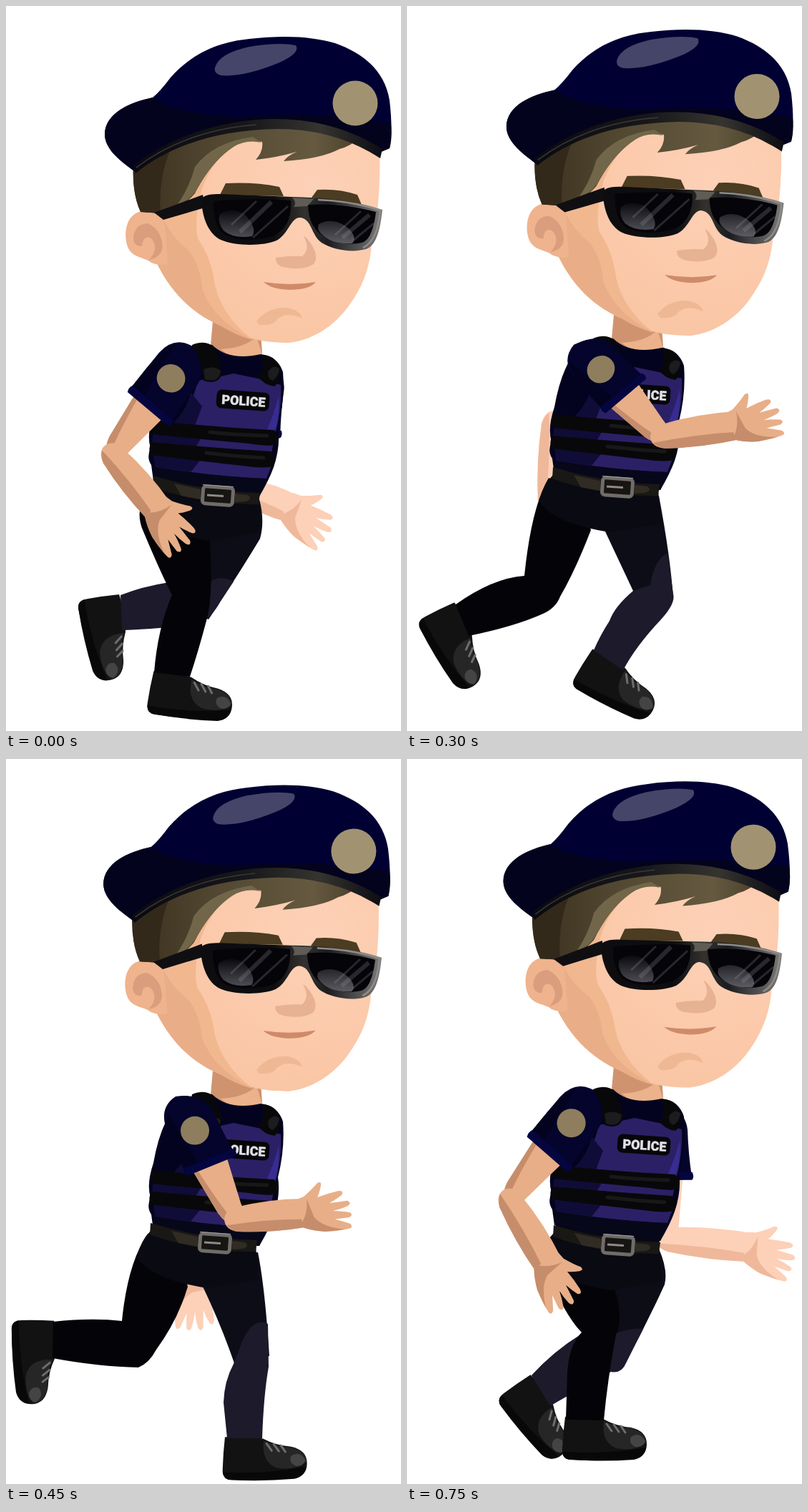
Write an HTML page that moves like this. It is 552x1014 px and loops after 900 ms.

```html
<!DOCTYPE html>
<html lang="en">
<head>
<meta charset="utf-8">
<title>Running officer</title>
<style>
html, body { margin: 0; width: 100%; height: 100%; overflow: hidden; background: #fff; }
svg { display: block; width: 552px; height: 1014px; }
.near { --skin: #e8ae87; --shade: #c58d6b; }
.far { --skin: #fdd0b8; --shade: #efb89b; }
.label { font: 900 18px Roboto, "Liberation Sans", sans-serif; fill: #e0e0e6; stroke: #e0e0e6; stroke-width: .5; text-anchor: middle; }
</style>
</head>
<body>
<svg viewBox="0 0 552 1014">
  <defs>
    <radialGradient id="face" gradientUnits="userSpaceOnUse" cx="430" cy="250" r="240"><stop stop-color="#fdd1b7"/><stop offset=".5" stop-color="#fccbad"/><stop offset="1" stop-color="#f9c5a3"/></radialGradient>
    <linearGradient id="hair" x1="0" x2="1"><stop stop-color="#3b301e"/><stop offset=".35" stop-color="#514630"/><stop offset=".8" stop-color="#655a40"/><stop offset="1" stop-color="#4a3f2a"/></linearGradient>
    <linearGradient id="band" x1="0" x2="1"><stop stop-color="#0a0a10"/><stop offset=".45" stop-color="#17171a"/><stop offset=".75" stop-color="#35342f"/><stop offset="1" stop-color="#0d0d14"/></linearGradient>
    <linearGradient id="frame" x1="0" x2="1"><stop offset=".4" stop-color="#0d0d10"/><stop offset=".57" stop-color="#33322f"/><stop offset=".7" stop-color="#1c1c20"/><stop offset="1" stop-color="#7d7b79"/></linearGradient>
    <linearGradient id="glare" x1="0" y1="0" x2="0" y2="1"><stop stop-color="#0a0a0f"/><stop offset="1" stop-color="#5c5c62"/></linearGradient>

    <g id="upper">
      <path fill="var(--skin)" d="M60 -28L60 29L152 20Q176 16 175 0Q172 -14 152 -15Z"/>
      <path fill="var(--shade)" d="M70 28L152 20Q170 16 174 4Q140 14 70 22Z"/>
    </g>
    <g id="fore">
      <path fill="var(--skin)" d="M0 -16Q50 -24 102 -20L102 20Q50 24 0 18Q-18 14 -18 0Q-16 -14 0 -16Z"/>
      <path fill="var(--shade)" d="M-15 8Q45 4 102 9L102 20Q50 24 0 18Q-10 15 -15 8Z"/>
    </g>
    <g id="hand" transform="scale(1.07)">
      <path fill="var(--skin)" d="M-6 -19L5 -21Q18 -28 26 -34Q32 -36 30 -30Q26 -21 22 -16Q36 -18 50 -18Q58 -17 54 -12Q46 -8 36 -5Q48 -4 59 -3Q65 1 58 4Q48 6 38 6Q50 9 59 13Q63 17 57 19Q46 18 38 17L56 27Q60 33 53 33Q36 33 22 30Q8 26 -4 19Z"/>
      <path fill="var(--shade)" d="M8 -17Q6 0 -5 12L-4 19Q8 26 22 30L48 33Q20 24 12 8Z"/>
    </g>
    <g id="sleeve">
      <path fill="#04042c" d="M-22 4Q-18 32 14 35Q50 36 84 37L86 -37Q50 -34 20 -35Q-10 -34 -22 4Z"/>
      <path fill="#030320" d="M-10 24Q10 35 40 36L82 37L83 14Q40 20 -10 24Z"/>
      <path fill="#050540" d="M74 37Q80 40 86 37L90 -37Q86 -41 79 -38Z"/>
    </g>
    <g id="shoe">
      <path fill="#121212" d="M-26 -3Q0 -6 27 0Q45 10 66 12Q88 17 88 35Q88 53 70 56Q25 59 -18 57Q-31 56 -30 42Q-29 20 -26 -3Z"/>
      <path fill="#262626" d="M28 3Q46 12 66 13Q86 18 87 34Q70 46 45 41Q24 32 28 3Z"/>
      <path fill="#444" d="M66 25Q78 17 86 31Q82 41 72 39Q62 34 66 25Z"/>
      <path fill="#080808" d="M-30 46Q30 50 87 40Q85 54 70 57Q25 60 -18 57Q-29 57 -30 46Z"/>
      <path stroke="#6d6d6d" stroke-width="3" stroke-linecap="round" d="M32 7L39 17M42 8L49 18M52 10L58 19"/>
    </g>
  </defs>

  <g class="far">
    <use id="fUpper" href="#upper"/><use id="fFore" href="#fore"/><use id="fHand" href="#hand"/><use id="fSleeve" href="#sleeve"/>
  </g>
  <use id="fShoe" href="#shoe"/>
  <path id="fThigh" fill="#0d0d17"/>
  <path id="fShin" fill="#1c1a2b"/>
  <use id="nShoe" href="#shoe"/>
  <path id="nLeg" fill="#040408"/>

  <g id="hips">
    <path fill="#0a0a12" d="M214 640L206 668Q192 682 187 705Q205 735 285 748L357 736L353 690L356 650Z"/>
  </g>

  <g id="torso">
    <path fill="#d0936f" d="M290 430L286 474Q305 500 340 496L358 486L355 440Z"/>
    <path fill="#ecb28c" d="M300 480Q335 478 350 462L358 488Q325 502 300 480Z"/>
    <path fill="#03031f" d="M246 486Q262 470 288 474Q312 497 356 487Q380 490 387 512Q390 550 380 590Q384 615 374 645Q368 662 354 686Q280 684 206 664L203 642Q196 632 202 618Q196 600 206 570Q214 525 230 500Z"/>
    <path fill="#2b2066" d="M268 524Q260 560 238 585Q300 592 376 600Q386 560 384 530L352 521L318 514L300 518Z"/>
    <path fill="#372c91" d="M381 545Q383 580 374 596L364 594Q375 570 381 545Z"/>
    <path fill="#100c38" d="M258 540Q252 570 226 590L262 592L274 560Z"/>
    <path fill="#2b2066" d="M206 598L374 610L370 630L204 618Z"/>
    <path fill="#2b2066" d="M206 626L372 640L364 661Q290 658 210 645Z"/>
    <path fill="#100c38" d="M206 596L274 602L262 622L203 618ZM206 626L274 632L258 652L208 645Z"/>
    <path fill="#07071a" d="M206 645Q290 658 364 661L354 686Q270 684 207 662Z"/>
    <path fill="#08080a" d="M206 580Q290 589 374 593Q384 599 378 613Q370 617 340 612Q270 606 205 599Q200 590 206 580ZM204 610Q290 618 370 623Q379 630 374 643Q365 648 330 643Q260 635 202 628Q198 618 204 610Z"/>
    <path fill="none" stroke="#181818" stroke-width="5" stroke-linecap="round" d="M285 596Q320 600 365 601M280 625Q320 630 360 632"/>
    <path fill="#08080a" d="M260 474Q280 466 291 478Q303 502 301 517Q295 530 276 524Q272 500 258 485ZM356 488Q376 487 383 507Q384 526 375 532Q360 530 352 518Q364 510 356 488Z"/>
    <path fill="#1c1c1e" d="M276 508Q290 502 300 510Q298 528 278 522ZM367 510Q376 500 382 508Q380 520 372 524Q364 520 367 510Z"/>
    <g transform="rotate(4 331 552)">
      <rect x="294" y="538.5" width="74" height="26" rx="7" fill="#060608"/>
      <text class="label" x="332" y="558.5">POLICE</text>
    </g>
  </g>

  <g id="belt">
    <path fill="#1a1815" d="M206 657Q280 680 355 681L353 697Q275 698 205 673Z"/>
    <path fill="#302c24" d="M235 668L272 676L272 690L245 685ZM320 682L338 684Q346 690 334 693L320 694Z"/>
    <g transform="rotate(4 296 685)">
      <rect x="275" y="673" width="42" height="24" rx="4" fill="#171512" stroke="#6f6c69" stroke-width="5"/>
      <path stroke="#8d8a87" stroke-width="3" d="M281 685H304"/>
      <path fill="none" stroke="#a5a29f" d="M274 671H317"/>
    </g>
  </g>

  <g class="near">
    <use id="nUpper" href="#upper"/><use id="nFore" href="#fore"/><use id="nHand" href="#hand"/>
    <g id="nSleeve"><use href="#sleeve"/><circle cx="33" r="20" fill="#8e7e5d"/></g>
  </g>

  <g id="head">
    <path fill="url(#face)" d="M222 280L210 358C228 395 255 428 300 447C335 467 365 471 395 471C435 467 465 440 480 418C500 390 508 365 511 335C519 300 524 250 522 195L350 165L240 200Z"/>
    <path fill="#f1b890" d="M335 183Q290 210 274 255Q262 300 268 325Q285 350 290 378Q296 430 345 467Q320 460 300 447C255 428 228 395 210 358L216 280Z"/>
    <path fill="#e9ae88" d="M216 290Q232 325 256 342Q272 365 274 395Q290 440 345 467Q320 460 300 447C255 428 228 395 210 358Z"/>
    <path fill="#efb38d" d="M222 304C217 287 202 285 190 287C165 291 164 324 171 339C178 353 194 351 203 359Q214 364 226 361Z"/>
    <path fill="#da9d7d" d="M178 324Q180 305 198 304Q215 312 218 330Q222 350 200 355Q214 340 204 326Q192 318 190 336Q178 336 178 324Z"/>
    <path fill="url(#hair)" d="M178 222Q176 262 188 288L216 290Q245 285 264 262Q284 222 315 198Q335 185 358 190Q360 203 349 215Q378 212 406 204Q394 209 388 217Q440 214 466 200Q482 196 494 184L400 150Q280 165 178 222Z"/>
    <path fill="#33291a" d="M178 222Q176 262 188 288L216 290Q212 240 232 195Z"/>
    <path fill="#716649" d="M345 183Q290 190 264 225Q256 255 238 280Q258 272 268 254Q290 215 318 197Q335 186 357 191Z"/>
    <path fill="#000032" d="M181 232C155 214 138 198 138 179C139 150 172 135 205 128Q215 120 230 100C262 64 300 50 340 46C390 40 430 43 460 52C505 68 530 95 536 132Q541 175 536 199L524 204Q440 160 360 164Q250 170 181 232Z"/>
    <path fill="#03031e" d="M181 232C155 214 138 198 138 179C139 150 172 135 205 128Q235 150 320 155Q430 146 538 165Q540 185 536 199L524 204Q440 160 360 164Q250 170 181 232Z"/>
    <path fill="url(#band)" d="M178 223Q250 168 350 159Q450 152 526 200L523 213Q460 172 380 172Q255 174 181 234Z"/>
    <path fill="none" stroke="#3a3a3c" stroke-width="1.5" d="M182 226Q250 174 350 166"/>
    <path fill="#45456a" d="M292 86Q298 66 340 57Q382 50 405 55Q412 66 380 80Q330 100 300 97Q290 94 292 86Z"/>
    <circle cx="488" cy="136" r="31.5" fill="#a19372"/>
    <path fill="#4b3c22" d="M299 264L307 248Q348 246 382 253L388 266ZM427 268L435 257Q465 255 491 264L497 278Z"/>
    <path fill="#0f0f12" d="M207 289L275 264L278 282L220 299Z"/>
    <path fill="url(#frame)" d="M273 270Q278 262 300 263L400 267Q475 268 526 285C523 312 518 335 503 340C482 346 455 340 441 331C426 320 428 299 412 296C398 294 396 318 378 328C360 336 320 336 300 327C282 318 274 295 273 270Z"/>
    <path fill="#040409" d="M290 273Q350 268 398 272C400 300 388 316 372 322C350 329 325 328 308 321C292 312 290 290 290 273ZM422 278Q470 275 517 288C514 312 508 328 497 331C475 336 452 329 441 320C426 308 423 295 422 278Z"/>
    <path fill="url(#glare)" d="M298 292Q312 280 332 290Q352 310 344 322Q318 326 304 314Q296 304 298 292ZM437 305Q455 295 475 308Q492 322 484 332Q455 334 440 318Q434 312 437 305Z"/>
    <path stroke="#a5a5ad" stroke-opacity=".22" stroke-width="6" d="M327 316L371 274M470 324L508 292"/>
    <path stroke="#a5a5ad" stroke-opacity=".22" stroke-width="3" d="M315 306L350 273M345 324L394 280M460 320L496 287M485 328L514 304"/>
    <path fill="#5f5c56" d="M400 268L430 270L421 280L402 281Q407 275 400 268Z"/>
    <path fill="none" stroke="#8e8c89" stroke-width="2.5" d="M436 271Q485 273 523 286Q519 329 499 338"/>
    <path fill="#e7b293" d="M377 352Q376 364 392 366Q416 370 430 361Q438 350 426 332Q418 321 416 322Q426 340 414 350Q396 349 377 352Z"/>
    <path fill="#cf8b69" d="M360 386Q398 392 433 386Q424 397 396 397Q370 396 360 386Z"/>
    <path fill="#efb894" d="M350 441Q365 421 392 422Q411 425 414 437Q392 427 379 438Q374 448 354 446Z"/>
  </g>
</svg>
<script>
const el = {};
document.querySelectorAll("[id]").forEach(e => el[e.id] = e);

// Joints are [x, y]; arms: elbow, wrist, hand angle; shoes: ankle and angle.
const poses = [
  { head: [0, 0], torso: [0, 0], hips: [0, 0],
    nArm: [[150, 628], [212, 704], 47], fArm: [[337, 678], [397, 702], 29],
    nShoe: [232, 936, 6], fShoe: [161, 849, 77],
    nLeg: "M200 672Q178 705 192 735Q215 790 232 824Q212 870 207 932L257 938Q268 905 280 860Q290 825 285 750L270 690Z",
    fThigh: "M280 690L354 690Q362 720 355 745Q325 795 283 858L250 840L275 740Z",
    fShin: "M228 806Q190 812 160 824L162 873Q230 870 270 864Q288 855 300 832L318 805Q300 795 285 805Z" },
  { head: [-14, .75], torso: [0, -13], hips: [-1, -16],
    nArm: [[325, 640], [425, 643], 0], fArm: [[255, 625], [270, 698], 90],
    nShoe: [150, 924, 22], fShoe: [221, 845, 75],
    nLeg: "M198 660Q176 690 182 735Q184 790 190 815Q160 840 150 862Q135 890 128 912L173 938Q205 885 230 850Q250 790 264 733L250 680Z",
    fThigh: "M275 728L293 802L350 835Q357 780 358 715L352 685L290 690Z",
    fShin: "M293 801Q260 803 222 820L225 872Q290 862 322 856Q345 848 350 830L355 770Q325 785 325 800Z" },
  { head: [-10, .2], torso: [0, -9], hips: [-2, -12],
    nArm: [[358, 601], [458, 587], -20], fArm: [[206, 585], [203, 690], 60],
    nShoe: [77, 858, 59], fShoe: [281, 914, 27],
    nLeg: "M198 660Q174 700 164 797Q120 800 68 837L86 881Q150 868 190 850Q208 842 214 826Q235 790 257 733L240 680Z",
    fThigh: "M277 735L316 818L372 828Q368 770 352 685L290 690Z",
    fShin: "M316 818Q290 840 283 860Q270 880 261 901L302 929Q320 895 355 858Q376 835 372 822L364 765Q345 775 340 810Z" },
  { head: [-6, -.4], torso: [0, -5], hips: [-4, -8],
    nArm: [[322, 643], [416, 635], -13], fArm: [[250, 640], [267, 733], 85],
    nShoe: [66, 812, 86], fShoe: [332, 951, -1],
    nLeg: "M198 664Q170 705 162 786Q120 781 66 787L65 838Q130 850 185 851Q200 845 210 826Q240 785 254 738L240 680Z",
    fThigh: "M275 738Q300 790 319 845L368 835Q362 740 352 690L290 690Z",
    fShin: "M318 846Q305 870 304 900L309 950L358 950Q360 890 367 850L366 790Q345 780 330 815Z" },
  { head: [-23, .55], torso: [0, -25], hips: [-2, -29],
    nArm: [[231, 643], [327, 693], 21], fArm: [[285, 640], [311, 711], 55],
    nShoe: [134, 852, 53], fShoe: [248, 917, 25],
    nLeg: "M202 640Q168 675 181 708Q200 755 218 781Q170 785 122 831L146 873Q200 852 245 832Q258 825 259 810L275 797L275 700L240 665Z",
    fThigh: "M275 700L275 825L322 838Q340 800 352 735L350 665L290 680Z",
    fShin: "M275 820Q250 835 242 860Q232 885 228 907L268 929Q290 890 315 858Q328 845 330 835L337 780Q310 790 298 815Z" },
  { head: [-11, -.75], torso: [0, -12], hips: [-1, -5],
    nArm: [[145, 618], [197, 706], 58], fArm: [[366, 671], [478, 683], 13],
    nShoe: [247, 923, 0], fShoe: [187, 883, 50],
    nLeg: "M205 690Q203 735 218 765Q232 790 244 802Q226 820 224 860L222 924L275 925Q280 870 292 805Q300 790 295 760L285 720Z",
    fThigh: "M285 690L352 685Q365 715 360 735Q335 790 305 845L255 830L275 740Z",
    fShin: "M244 804Q205 828 174 862L200 905Q225 890 245 880L285 857Q300 860 306 845L330 797Q300 795 270 815Z" }
];

const place = (id, x, y, turn = 0, stretch = 1) =>
  el[id].setAttribute("transform", `translate(${x} ${y}) rotate(${turn}) scale(${stretch} 1)`);

function bone(id, [x, y], [u, v], length) {
  const dx = u - x, dy = v - y;
  place(id, x, y, Math.atan2(dy, dx) * 180 / Math.PI, Math.hypot(dx, dy) / length);
}

function arm(side, shoulder, [elbow, wrist, turn]) {
  bone(side + "Upper", shoulder, elbow, 170);
  bone(side + "Sleeve", shoulder, elbow, 170);
  bone(side + "Fore", elbow, wrist, 100);
  place(side + "Hand", ...wrist, turn);
}

function pose(p) {
  const [lift, tilt] = p.head, dy = p.torso[1];
  el.head.setAttribute("transform", `translate(0 ${lift}) rotate(${tilt} 350 440)`);
  place("torso", ...p.torso);
  place("hips", ...p.hips);
  place("belt", ...p.hips);
  arm("n", [250, 495 + dy], p.nArm);
  arm("f", [356, 513 + dy], p.fArm);
  for (const id of ["nShoe", "fShoe"]) place(id, ...p[id]);
  for (const id of ["nLeg", "fThigh", "fShin"]) el[id].setAttribute("d", p[id]);
}

let shown = -1;
function tick() {
  const step = Math.floor(performance.now() / 150) % poses.length;
  if (step !== shown) pose(poses[shown = step]);
  requestAnimationFrame(tick);
}
tick();
</script>
</body>
</html>
```
